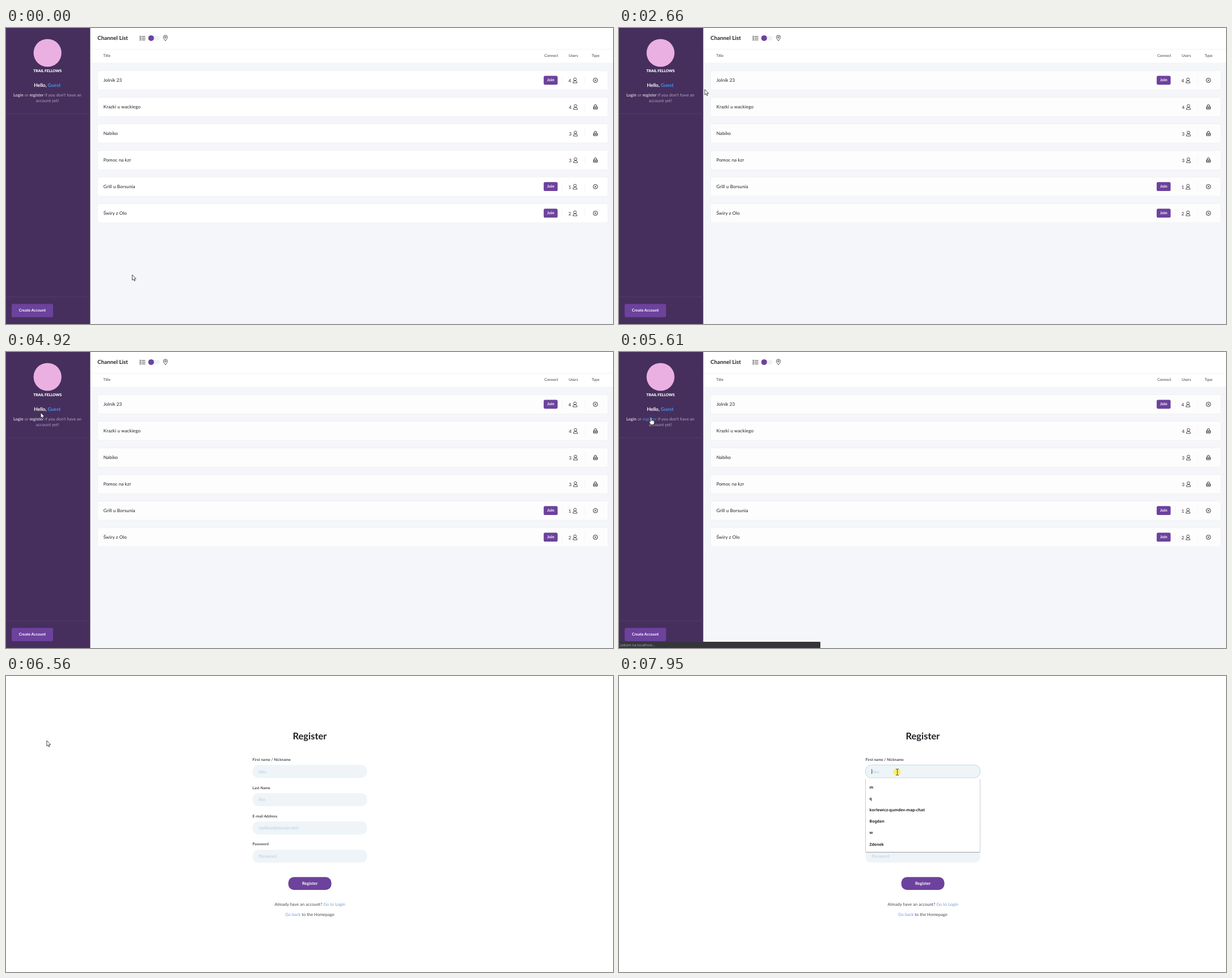
Animation of 1070x523 px, one loop 8000 ms. Source, as an HTML page:

```html
<!DOCTYPE html>
<html lang="en">
<head>
<meta charset="utf-8">
<title>Channel list and registration</title>
<style>
  html, body { margin: 0; width: 100%; height: 100%; overflow: hidden; background: #fff; }
  svg { display: block; width: 100%; height: 100%; }
  text { font-family: Lato, "Open Sans", sans-serif; text-rendering: geometricPrecision; white-space: pre; }
  .ui { font-family: "Noto Sans", "Open Sans", sans-serif; }
</style>
</head>
<body>
<svg id="stage" viewBox="0 0 1070 523" xmlns="http://www.w3.org/2000/svg"></svg>
<script>
const LOOP = 8000, STEP = 77.8, START = 870;
const PURPLE = '#6c429d', INK = '#212025', BLUE = '#4a90e6', PALE = '#6c9ae0';

const rect = (x, y, w, h, fill, r = 0, more = '') =>
  `<rect x="${x}" y="${y}" width="${w}" height="${h}" rx="${r}" fill="${fill}" ${more}/>`;
const path = (d, more = '') => `<path d="${d}" ${more}/>`;
const circle = (x, y, r, more) => `<circle cx="${x}" cy="${y}" r="${r}" ${more}/>`;
const text = (x, y, s, size, fill = INK, weight = 400, more = '') =>
  `<text x="${x}" y="${y}" font-size="${size}" fill="${fill}" font-weight="${weight}" ${more}>${s}</text>`;
const group = (id, body, more = '') => `<g id="${id}" ${more}>${body}</g>`;
const at = (x, y, body, more = '') => `<g transform="translate(${x} ${y})" ${more}>${body}</g>`;
const MID = 'text-anchor="middle"';
const LOOSE = 'letter-spacing=".07"';
const LINE = `fill="none" stroke="${INK}" stroke-width=".8"`;

// Icons are centred on their own zero point.
const userIcon = circle(0, -2, 2.4, '') + path('M-3.6 4.4 Q-3.6 .8 -1.2 .8 H1.2 Q3.6 .8 3.6 4.4 Z');
const openIcon = circle(0, 0, 3.9, '') + path('M-1.5 -1.5 L1.5 1.5 M1.5 -1.5 L-1.5 1.5');
const lockIcon = rect(-3.5, -.4, 7, 4.3, 'none', .5) + path('M-2.1 -.4 V-2.2 Q-2.1 -3.9 0 -3.9 Q2.1 -3.9 2.1 -2.2 V-.4 M0 1 V2.4 M-3.5 1.8 H3.5');

// title, users, open to join
const channels = [
  ['Jolnik 23', 4, true],
  ['Krazki u wackiego', 4, false],
  ['Nabiko', 3, false],
  ['Pomoc na kzr', 3, false],
  ['Grill u Borsunia', 1, true],
  ['Świry z Olo', 2, true]
];

function channelRow([title, users, open], i) {
  const y = 92.3 + i * 46.98, shift = open ? 0 : .8;
  return rect(161.5, y - 16.8, 899.5, 33.8, '#fff', 3, `id="row${i}" stroke="#eff0f5" stroke-width=".8"`)
    + text(171.7, y + 2.9, title, 8.1, INK, 400, 'letter-spacing=".1"')
    + (open ? rect(947.8, y - 7.9, 24.6, 15.8, PURPLE, 2.6)
      + text(960.1, y + 1.9, 'Join', 7, '#fff', 700, MID)
      + path(`M980.5 ${y - 8} v16`, 'stroke="#f3f3f7" stroke-width=".8"') : '')
    + path(`M1020 ${y - 8} v16`, 'stroke="#f3f3f7" stroke-width=".8"')
    + text(991.4 + shift, y + 3.5, users, 8)
    + at(1003 + shift, y + .3, userIcon, LINE)
    + at(1039, y + .1, open ? openIcon : lockIcon, LINE.replace('.8', '.9'));
}

function sidebar() {
  const rule = y => rect(0, y, 148.5, .8, '#553e6c');
  return rect(0, 0, 148.5, 523, '#462f5d')
    + circle(73.2, 44, 24.6, 'fill="#eab0e1"')
    + text(73.2, 77.6, 'TRAIL FELLOWS', 6.6, '#fff', 900, MID)
    + text(49.2, 104.2, `Hello, <tspan fill="${BLUE}">Guest</tspan>`, 8.6, '#fff', 700)
    + text(73, 120.7, '<tspan fill="#fff">Login</tspan> or <tspan id="signup">register</tspan> if you don\'t have an',
      7.4, '#b3a6c0', 400, MID + ' ' + LOOSE)
    + text(73, 130.8, 'account yet!', 7.4, '#b3a6c0', 400, MID + ' ' + LOOSE)
    + rule(150.8) + rule(474.6)
    + rect(10, 487.6, 73, 23.5, PURPLE, 3)
    + text(46.4, 501.2, 'Create Account', 6.9, '#fff', 700, MID);
}

function topbar() {
  const list = [14.2, 17.2, 20.2].map(y =>
    rect(235.8, y, 2, 1.6, 'none', .3, `stroke="${INK}" stroke-width=".6"`)
    + rect(239.2, y + .3, 6.4, 1, '#3a3940')).join('');
  const head = [[171.3, 'Title'], [949, 'Connect'], [992, 'Users'], [1032.4, 'Type']]
    .map(([x, s]) => text(x, 51.1, s, 6.6, '#3b3a42')).join('');
  return rect(148.5, 0, 921.5, 62, '#fff')
    + rect(148.5, 37.2, 921.5, .8, '#eef0f5')
    + rect(148.5, 61.6, 921.5, .8, '#f0f1f5')
    + text(161.2, 20.8, 'Channel List', 9.7, INK, 700, LOOSE)
    + list
    + rect(251, 14, 20, 8, '#eef3f7', 4)
    + circle(255.8, 17.9, 5, `fill="${PURPLE}"`)
    + at(281, 17.2, path('M0 5.5 C-2 2.5 -3.6 1 -3.6 -.8 A3.6 3.6 0 0 1 3.6 -.8 C3.6 1 2 2.5 0 5.5 Z')
      + circle(0, -.8, 1.4, ''), LINE)
    + head;
}

function registerForm() {
  const fields = [['First name / Nickname', 'Alec'], ['Last Name', 'Fen'],
    ['E-mail Address', 'mailbox@domain.test'], ['Password', 'Password']];
  const inputs = fields.map(([label, hint], i) => {
    const y = 157.2 + i * 49.95;
    return text(434.6, y - 7.6, label, 6.6, INK, 500, 'letter-spacing=".06"')
      + rect(434.6, y, 202, 22.8, '#eef4f7', 10, `id="field${i}"`)
      + text(445.2, y + 14.3, hint, 7.5, '#b4cdea');
  }).join('');
  return text(535.5, 112.2, 'Register', 16.5, INK, 700, MID)
    + inputs
    + rect(497.6, 355.2, 76, 22.8, PURPLE, 10)
    + text(535.6, 369.3, 'Register', 7.5, '#fff', 700, MID)
    + text(535.8, 406, `Already have an account? <tspan fill="${PALE}">Go to Login</tspan>`, 7.4, '#45444b', 400, MID + ' ' + LOOSE)
    + text(535.6, 424, `<tspan fill="${PALE}">Go back</tspan> to the Homepage`, 7.4, '#45444b', 400, MID + ' ' + LOOSE);
}

function suggestions() {
  const items = ['m', 'q', 'korlewicz-qumdev-map-chat', 'Bogdan', 'w', 'Zdenek'];
  return rect(434, 182, 203.2, 130.6, '#000', 1, 'opacity=".07"')
    + rect(434.4, 182, 202.4, 129.8, '#000', 1, 'opacity=".28"')
    + rect(434.9, 180.8, 201.4, 130, '#fff')
    + items.map((s, i) => text(441.5, 198.7 + i * 20.17, s, 6.9, '#27262a', 600, 'class="ui"')).join('');
}

const cursors = group('arrow', path('M0 0 V9.6 L2.2 7.6 L3.7 11 L5.2 10.3 L3.8 7.1 H6.8 Z'))
  + group('hand', path('M-1.1 1 Q0 -.8 1.1 1 V4.6 Q2.2 3.9 2.8 5 Q3.8 4.4 4.4 5.5 Q5.8 5.1 5.9 6.7 V9.5 Q5.8 11.4 4.8 13 H-.2 Q-1.6 11 -3.2 8.3 Q-3.6 6.8 -2.2 6.9 L-1.1 8 Z M1.1 4.6 V6.6 M2.8 5 V6.9 M4.4 5.5 V7'))
  + group('beam', path('M-2.4 -5.4 H-.7 L0 -4.8 L.7 -5.4 H2.4 M0 -4.8 V4.8 M-2.4 5.4 H-.7 L0 4.8 L.7 5.4 H2.4', 'fill="none"'));

const stage = document.getElementById('stage');
stage.innerHTML = rect(0, 0, 1070, 523, '#fff')
  + group('home', rect(148.5, 0, 921.5, 523, '#f5f6fa') + topbar() + channels.map(channelRow).join('') + sidebar())
  + group('form', registerForm())
  + group('focus', path('M445.7 164.4 V173', `stroke="${INK}" stroke-width=".8"`)
    + suggestions() + circle(490, 169.8, 6.4, 'fill="#f8f06c"'))
  + group('status', rect(0, 512, 43, 11, '#35363b', 1, 'id="statusBox"')
    + text(-1.9, 520.3, '', 6.3, '#a9abb0', 400, 'id="statusText" class="ui"'))
  + group('pointer', cursors, 'fill="#fff" stroke="#1b1b20" stroke-width=".8" stroke-linejoin="round"');

const part = {};
stage.querySelectorAll('[id]').forEach(el => part[el.id] = el);
const show = (id, on) => part[id].setAttribute('visibility', on ? 'inherit' : 'hidden');
const set = (id, name, value) => part[id].setAttribute(name, value);

// time, x, y of the pointer tip
const route = [
  [0, 222.5, 436], [870, 222, 434], [1030, 218, 412], [1260, 229, 379], [1420, 243, 357],
  [1650, 286, 305], [1730, 306.5, 272], [1960, 296, 222], [2260, 240, 150], [2500, 182, 114],
  [2820, 120, 103], [3130, 86, 97], [3360, 82.5, 97], [3990, 82.5, 97], [4200, 84.5, 93],
  [4500, 79, 96], [4770, 64, 102], [5160, 56.3, 115.5], [6460, 56.3, 115.5],
  [6700, 98, 112], [7020, 218.5, 111], [7250, 413, 136], [7400, 452, 154],
  [7560, 480, 165], [7780, 490.7, 169.8], [8000, 490.7, 169.8]
];

function pointerAt(t) {
  const i = Math.max(1, route.findIndex(p => p[0] >= t));
  const [t0, x0, y0] = route[i - 1], [t1, x1, y1] = route[i];
  const k = (t - t0) / (t1 - t0);
  return [x0 + (x1 - x0) * k, y0 + (y1 - y0) * k];
}

// start, end, width of box, label
const notes = [
  [3050, 4560, 43, 'localhost:3001'],
  [4980, 5530, 69, 'localhost:3001/register'],
  [5530, 5910, 355, 'Czekam na localhost...'],
  [5910, 6460, 355, 'Łączę...']
];
const rowTouched = [2360, 2200, 2010, 1850, 1640, 1500];

function draw(time) {
  // The screen refreshes in even steps.
  const t = time < START ? 0 : Math.min(LOOP, START + Math.floor((time - START + 8) / STEP) * STEP);
  const [x, y] = pointerAt(t);
  const overGuest = t >= 3050 && t < 4560;
  const overSignup = t >= 4980 && t < 6460;
  const hand = overGuest || overSignup;
  const beam = x > 434.6 && y > 157;

  show('home', t < 5910);
  show('form', t >= 6240);
  show('focus', t >= 7940);
  set('field0', 'stroke', t >= 7940 ? '#b7cde0' : 'none');
  set('field0', 'stroke-width', .8);
  set('signup', 'fill', overSignup ? BLUE : '#fff');
  rowTouched.forEach((from, i) => set('row' + i, 'fill', t >= from ? '#fdfdfd' : '#fff'));

  const note = notes.find(n => t >= n[0] && t < n[1]);
  show('status', note);
  if (note) {
    set('statusBox', 'width', note[2]);
    part.statusText.textContent = note[3];
    const fade = note === notes[0] ? Math.min(1, (t - 3050) / 450, (4560 - t) / 300) : 1;
    set('status', 'opacity', Math.max(0, fade));
  }

  set('pointer', 'transform', `translate(${x.toFixed(2)} ${y.toFixed(2)})`);
  show('hand', hand);
  show('beam', beam);
  show('arrow', !hand && !beam);
}

const begin = performance.now();
function tick() {
  draw((performance.now() - begin) % LOOP);
  requestAnimationFrame(tick);
}
draw(0);
requestAnimationFrame(tick);
</script>
</body>
</html>
```
